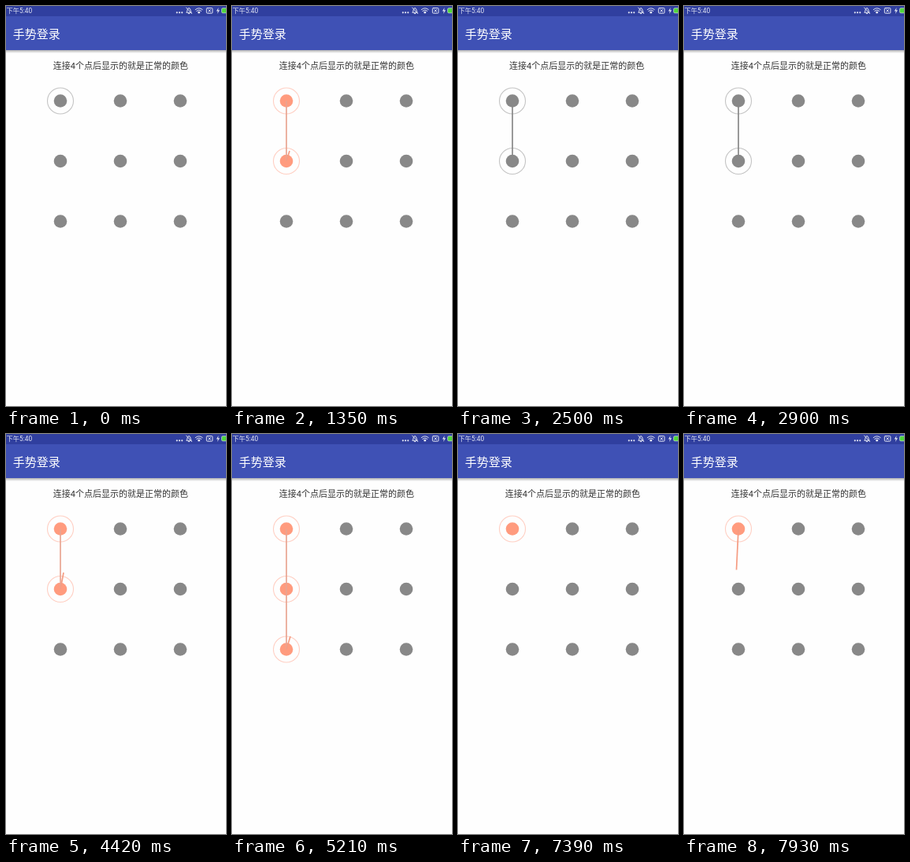
Animation of 279x508 px, one loop 8 s. Source, as an HTML page:

```html
<!DOCTYPE html>
<html lang="zh-CN">
<head>
<meta charset="utf-8">
<title>手势登录</title>
<style>
  html, body { margin: 0; width: 100%; height: 100%; overflow: hidden; background: #fefefe; }
  svg { display: block; width: 279px; height: 508px; }
  text { font-family: Roboto, "Noto Sans CJK SC", "Noto Sans CJK", sans-serif; }
  .icons { fill: none; stroke: #e3e6f4; stroke-width: 1; stroke-linecap: round; stroke-linejoin: round; }
  .icons .solid { fill: #e3e6f4; stroke: none; }
  .dot { fill: #888; }
  .ring { fill: none; stroke: #c4c4c4; stroke-width: 1.1; visibility: hidden; }
  .path { fill: none; stroke: #888; stroke-width: 1.7; }
  .on .ring { visibility: visible; }
  .live .on .dot { fill: #ff9b7e; }
  .live .on .ring { stroke: #ffcfc3; }
  .live .path { stroke: #e9a592; }
  .live #tail { stroke: #f59c82; }
  #hint { font-size: 11px; fill: #333; }
</style>
</head>
<body>
<svg viewBox="0 0 279 508">
  <defs>
    <linearGradient id="shade" x1="0" y1="0" x2="0" y2="1">
      <stop offset="0" stop-color="#000" stop-opacity=".3"/>
      <stop offset="1" stop-color="#000" stop-opacity="0"/>
    </linearGradient>
  </defs>
  <rect width="279" height="508" fill="#fefefe"/>
  <rect y="56" width="279" height="4" fill="url(#shade)"/>
  <rect width="279" height="56" fill="#3f51b5"/>
  <rect width="279" height="13" fill="#303f9f"/>
  <text x="0.5" y="9.3" font-size="8.3" fill="#e3e6f4">下午5:40</text>
  <g class="icons">
    <path d="M216.8 8.3 h.01 m3.2 0 h.01 m3.2 0 h.01" stroke-width="2.2"/>
    <path class="solid" d="M269.6 2 L266.8 6.6 H268.8 L268 10 L271 5.2 H269 Z"/>
    <path d="M229 8 Q230 7 230 5 Q232 0 234 5 Q234 7 235 8 Z M231.2 9.6 h1.6 M228.6 2 l7 7.6"/>
    <path d="M240.2 4.6 Q244.7 .8 249.2 4.6 M241.7 6.3 Q244.7 3.7 247.7 6.3"/>
    <circle class="solid" cx="244.7" cy="8.2" r="1.4"/>
    <rect x="254.3" y="2.6" width="7.6" height="6.6" rx="1"/>
    <path d="M256.8 4.5 l2.8 2.8 m0 -2.8 l-2.8 2.8"/>
  </g>
  <rect x="273.5" y="2.7" width="8" height="6.2" rx="1.5" fill="#4fd63c" stroke="#e3e6f4" stroke-width=".6"/>
  <text x="8.8" y="41.2" font-size="15" fill="#fff">手势登录</text>
  <text id="hint" x="59.8" y="79.6">连接4个点后显示的就是正常的颜色</text>
  <g id="pad">
    <g id="dots"></g>
    <polyline id="joined" class="path"/>
    <polyline id="tail" class="path"/>
  </g>
</svg>
<script>
  const LOOP = 8000, TICK = 130;
  const XS = [69, 145, 221], YS = [120.5, 197, 273.5];
  const ROUTE = [0, 3, 6, 7];
  const points = YS.flatMap(y => XS.map(x => [x, y]));

  // time, joined dots, coloured
  const PHASES = [
    [0, 1, 0], [150, 1, 1], [1350, 2, 1], [2110, 2, 0], [3610, 1, 1],
    [4420, 2, 1], [5210, 3, 1], [5900, 4, 1], [7390, 1, 1]
  ];
  // time, fingertip x, y for each stroke; a bare time lifts the finger
  const STROKES = [
    [[300, 59.5, 115], [570, 62, 127], [950, 66, 150], [1350, 73, 184],
     [1500, 73, 192], [1810, 73, 206], [1960, 73, 210], [2110]],
    [[3920, 64.5, 134], [4300, 70, 167], [4420, 73, 176], [4690, 75, 197],
     [4960, 75, 226], [5210, 74, 257], [5360, 81, 265], [5750, 121, 263],
     [6030, 141, 269], [6150]],
    [[7530, 59, 117], [7660, 66, 140], [7930, 66.5, 172.5], [LOOP]]
  ];
  // time, hint offset: it shakes when the pattern is too short
  const SHAKE = [[0, 0], [2230, -3], [2350, -5.5], [2500, 5.3], [2630, -5.5], [2780, -2], [2900, 0]];

  const $ = id => document.getElementById(id);
  const current = (list, t) => list.filter(k => k[0] <= t).pop();

  // The fingertip moves between keys in equal hard steps.
  function fingertip(t) {
    const keys = STROKES.find(s => t >= s[0][0] && t < s[s.length - 1][0]);
    if (!keys) return null;
    const a = current(keys, t), b = keys[keys.indexOf(a) + 1];
    if (b.length === 1) return a.slice(1);
    const span = b[0] - a[0], n = Math.round(span / TICK);
    const p = Math.floor((t - a[0]) / span * n) / n;
    return [1, 2].map(i => a[i] + (b[i] - a[i]) * p);
  }

  $("dots").innerHTML = points.map(([x, y]) =>
    `<g><circle class="dot" cx="${x}" cy="${y}" r="8.3"/>` +
    `<circle class="ring" cx="${x}" cy="${y}" r="16.5"/></g>`).join("");
  const cells = [...$("dots").children];

  function draw(t) {
    const [, count, live] = current(PHASES, t);
    const route = ROUTE.slice(0, count);
    const tip = fingertip(t);
    cells.forEach((cell, i) => cell.classList.toggle("on", route.includes(i)));
    $("pad").classList.toggle("live", !!live);
    $("joined").setAttribute("points", route.map(i => points[i]).join(" "));
    $("tail").setAttribute("points", tip ? `${points[route[count - 1]]} ${tip}` : "");
    $("hint").setAttribute("transform", `translate(${current(SHAKE, t)[1]} 0)`);
  }

  const start = performance.now();
  function tick() {
    draw((performance.now() - start) % LOOP);
    requestAnimationFrame(tick);
  }
  tick();
</script>
</body>
</html>
```
